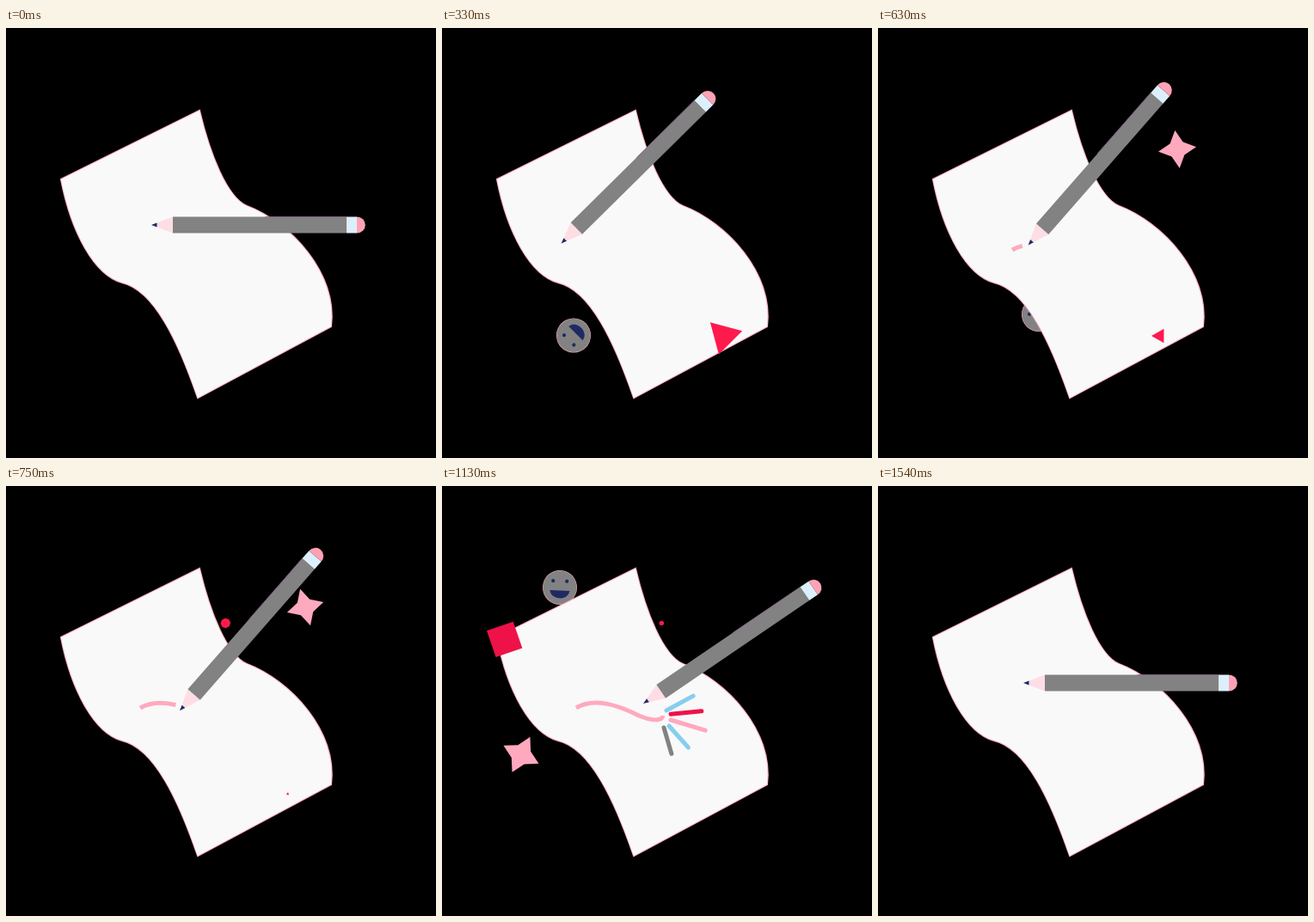
Recreate the animation shown at these times as an HTML page with a canvas. Size 500x500 px, loop 1580 ms.

```html
<!DOCTYPE html>
<html lang="en">
<head>
<meta charset="utf-8">
<title>Pencil and paper</title>
<style>
html, body { margin: 0; width: 100%; height: 100%; overflow: hidden; background: #000; }
canvas { display: block; }
</style>
</head>
<body>
<canvas id="stage" width="500" height="500"></canvas>
<script>
const ctx = document.getElementById('stage').getContext('2d');
const LOOP = 1580, STEP = 1000 / 24, DEG = Math.PI / 180;
const C = {
  paper: '#f9f9f9', pink: '#ffa9be', red: '#ff1a4d', crimson: '#ee1248', blue: '#85cef0',
  gray: '#828282', navy: '#1f2a64', wood: '#ffdde5', band: '#dceffa', eraser: '#ffa2b6', rim: '#8e6490'
};

// Smooth 0..1 ramp between two steps
const ease = (a, b, n) => {
  const t = Math.min(1, Math.max(0, (n - a) / (b - a)));
  return t * t * (3 - 2 * t);
};

// Grow from a to b, hold until c, shrink until d
const pop = ([a, b, c, d], n) => ease(a, b, n) * (1 - ease(c, d, n));

// Smooth curve through keys [step, ...values], at rest at both ends
function track(keys, n) {
  const last = keys.length - 1;
  if (n <= keys[0][0]) return keys[0].slice(1);
  if (n >= keys[last][0]) return keys[last].slice(1);
  const i = keys.findIndex(k => k[0] > n) - 1;
  const p = keys[i], q = keys[i + 1], d = q[0] - p[0], t = (n - p[0]) / d;
  const slope = (j, c) => j === 0 || j === last ? 0
    : (keys[j + 1][c] - keys[j - 1][c]) / (keys[j + 1][0] - keys[j - 1][0]);
  const s = t * t * (3 - 2 * t);
  return p.slice(1).map((v, k) => v + (q[k + 1] - v) * s
    + d * t * (1 - t) * ((1 - t) * slope(i, k + 1) - t * slope(i + 1, k + 1)));
}

function at(x, y, deg, draw) {
  ctx.save();
  ctx.translate(x, y);
  ctx.rotate(deg * DEG);
  draw();
  ctx.restore();
}

function fill(color, path) {
  ctx.fillStyle = color;
  ctx.fill(path);
}

function disc(x, y, r, color) {
  const p = new Path2D();
  p.arc(x, y, r, 0, 7);
  fill(color, p);
}

// Regular polygon, or a star when inner < 1
function polygon(points, r, inner, color) {
  const p = new Path2D();
  const count = inner < 1 ? points * 2 : points;
  for (let i = 0; i < count; i++) {
    const a = i * 2 * Math.PI / count;
    const d = inner < 1 && i % 2 ? r * inner : r;
    p.lineTo(d * Math.cos(a), d * Math.sin(a));
  }
  p.closePath();
  fill(color, p);
}

const sheet = new Path2D('M64 176L225 96C237 147 257 197 280 207C330 226 386 285 378 347' +
  'L223 430C201 366 173 305 135 296C103 287 76 238 64 176Z');
const squiggle = new Path2D('M156 258C177 246 203 254 229 267C243 273 257 274 256.5 267');
const squiggleLength = 108.5;
const wood = new Path2D('M-124.5 0L-99.5-9.5V9.5Z');
const lead = new Path2D('M-124.5 0L-118-2.5V2.5Z');
const barrel = new Path2D('M-99.5-9.5H102.5V9.5H-99.5Z');
const rim = new Path2D('M8-9.8H102.5V-9H8Z');
const band = new Path2D('M102.5-9.5H114.5V9.5H102.5Z');
const rubber = new Path2D('M114.5-9.5A9.8 9.5 0 0 1 114.5 9.5Z');
const mouth = new Path2D('M-11.5 3.5H11.5C10 15.5-10 15.5-11.5 3.5Z');

const rays = [
  [C.blue, 261, 261, 340, 218],
  [C.crimson, 266, 265.3, 357, 256.4],
  [C.pink, 266, 272, 368, 303],
  [C.blue, 264, 279, 321, 343],
  [C.gray, 258, 281, 280.5, 358]
];

// spin: reference step, angle there, degrees per step
const shapes = [
  { x: 327.6, y: 358, r: 22.3, sides: 3, inner: 1, color: C.red, life: [1, 8, 9, 20], spin: [8, -15, -6.4] },
  { x: 348, y: 141, r: 22.2, sides: 4, inner: .48, color: C.pink, life: [8, 15, 17.5, 26], spin: [15, -7, -2.9] },
  { x: 255.3, y: 159.5, r: 14.8, sides: 8, inner: 1, color: C.red, life: [15, 22, 22, 29], spin: [21, 8, 4] },
  { x: 72.7, y: 178.3, r: 23, sides: 4, inner: 1, color: C.crimson, life: [18, 27, 27, 35], spin: [27, 26, 4] },
  { x: 92, y: 312.3, r: 23, sides: 4, inner: .51, color: C.pink, life: [19.8, 27, 29, 37], spin: [27, 27, 3.8] }
];

const pencilPath = [
  [0, 293.5, 229], [8, 227.2, 163], [10, 225, 163.5], [13, 240, 161.5], [15, 256.7, 158.8],
  [21, 310.7, 176.8], [25, 339.5, 179.5], [27, 337, 182.9], [32, 307.5, 214.8], [36, 293.5, 229]
];
const sidePeek = [[2, 210, 316], [8, 153, 357.5], [10, 152.5, 358], [15, 187, 333], [18, 210, 316]];
const topPeek = [[17, 150, 165, 8], [21, 136, 127, 0], [24.5, 135.5, 112, -3], [27, 137, 118, 2], [31, 150, 165, 4]];

function face(x, y, deg) {
  at(x, y, deg, () => {
    disc(0, 0, 20, C.pink);
    disc(0, 0, 19.5, C.gray);
    disc(-8, -7.5, 2.1, C.navy);
    disc(8, -7.5, 2.1, C.navy);
    fill(C.navy, mouth);
  });
}

function drawMarks(n) {
  const tail = ease(29, 36, n);
  ctx.lineWidth = 5;

  const head = ease(12, 26, n);
  if (head > tail) {
    ctx.save();
    ctx.lineCap = 'butt';
    ctx.strokeStyle = C.pink;
    ctx.setLineDash([squiggleLength * (head - tail), 500]);
    ctx.lineDashOffset = -squiggleLength * tail;
    ctx.stroke(squiggle);
    ctx.restore();
  }

  const tip = ease(24, 31, n);
  if (tip <= tail) return;
  ctx.lineCap = 'round';
  for (const [color, x, y, X, Y] of rays) {
    ctx.strokeStyle = color;
    ctx.beginPath();
    ctx.moveTo(x + (X - x) * tail, y + (Y - y) * tail);
    ctx.lineTo(x + (X - x) * tip, y + (Y - y) * tip);
    ctx.stroke();
  }
}

function drawPencil(n) {
  const [x, y] = track(pencilPath, n);
  at(x, y, -48.8 * (ease(0, 9.75, n) - ease(22, 35.8, n)), () => {
    fill(C.wood, wood);
    fill(C.navy, lead);
    fill(C.gray, barrel);
    fill(C.rim, rim);
    fill(C.band, band);
    fill(C.eraser, rubber);
  });
}

function draw(n) {
  ctx.fillStyle = '#000';
  ctx.fillRect(0, 0, 500, 500);

  if (n > 2 && n < 18) face(...track(sidePeek, n), -135);
  if (n > 17 && n < 31) face(...track(topPeek, n));

  ctx.lineWidth = 2;
  ctx.strokeStyle = C.pink;
  ctx.stroke(sheet);
  fill(C.paper, sheet);

  drawMarks(n);
  for (const s of shapes) {
    const size = pop(s.life, n);
    const [from, angle, rate] = s.spin;
    if (size > 0) at(s.x, s.y, angle + (n - from) * rate, () => polygon(s.sides, s.r * size, s.inner, s.color));
  }
  drawPencil(n);
}

const start = performance.now();
function tick() {
  const t = (performance.now() - start) % LOOP;
  draw(Math.min(37, Math.floor((t + 5) / STEP)));
  requestAnimationFrame(tick);
}
tick();
</script>
</body>
</html>
```
